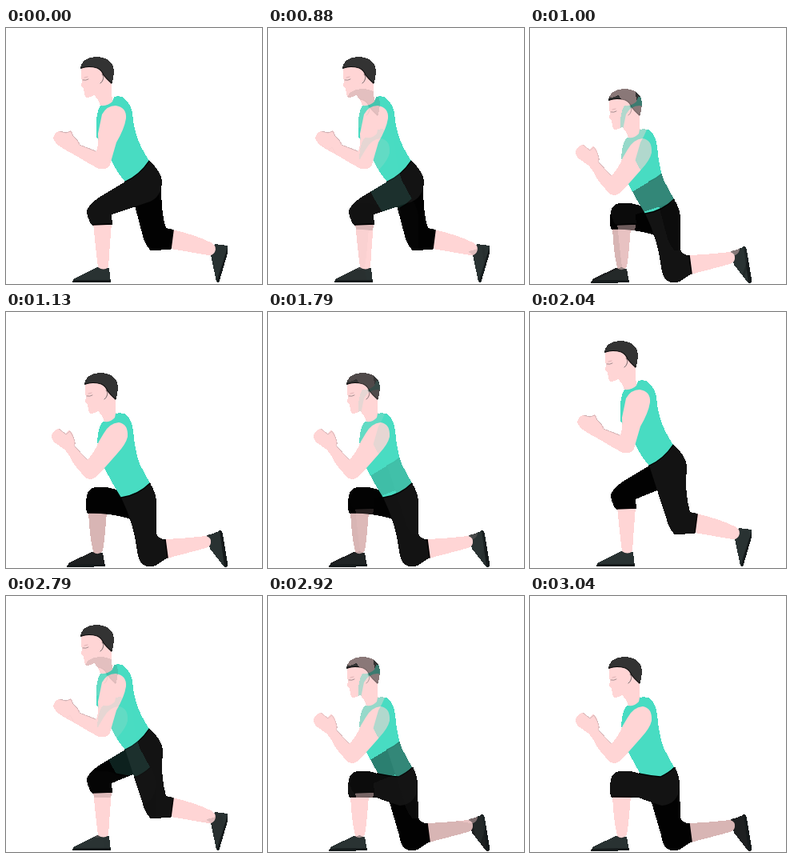
Write an HTML page with a canvas that moves like this. It is 320 px wide and 320 px high and loops after 3370 ms.

```html
<!DOCTYPE html>
<html lang="en">
<head>
<meta charset="utf-8">
<title>Lunge</title>
<style>
  html, body { margin: 0; width: 100%; height: 100%; overflow: hidden; background: #fff; }
  canvas { display: block; width: 100vmin; height: 100vmin; }
</style>
</head>
<body>
<canvas id="stage" width="320" height="320"></canvas>
<script>
const SIZE = 320, LOOP = 3370, FADE_STEPS = 7;
const SKIN = '#ffd5d5', SHADE = '#d8b5b4', SHIRT = '#48dcc2', HAIR = '#333';
const NEAR = '#131313', FAR = '#020202', SHOE = '#293232', DARK_SHOE = '#1e2021';
const SOLE = '#151a1b', LINE = '#c9adaf';

function makeCanvas() {
  const c = document.createElement('canvas');
  c.width = c.height = SIZE;
  return c;
}

function fill(g, color, d) {
  g.fillStyle = color;
  g.fill(new Path2D(d));
}

function line(g, color, width, d) {
  g.strokeStyle = color;
  g.lineWidth = width;
  g.lineCap = 'round';
  g.stroke(new Path2D(d));
}

// Gives the figure a hard cut-out outline.
function cutOut(g) {
  const img = g.getImageData(0, 0, SIZE, SIZE);
  for (let i = 3; i < img.data.length; i += 4) img.data[i] = img.data[i] < 128 ? 0 : 255;
  g.putImageData(img, 0, 0);
}

function head(g, dx, dy) {
  g.save();
  g.translate(dx, dy);
  fill(g, SKIN, 'M94 48 Q93 58 95 66 L94 72 L97 75 L98 82 Q98 87 103 87 L110 84 Q115 88 118 97 Q127 100 134 92 Q131 83 132 69 L128 50 Z');
  fill(g, HAIR, 'M93 51 Q94 37 114 36 Q133 37 135 53 Q135 62 132 70 Q126 64 122 59 Q120 53 114 50 Q104 47 93 51 Z');
  line(g, '#0c0c0c', 1.2, 'M94 50 Q104 47 114 50 Q120 53 122 59 Q126 64 132 69');
  fill(g, SKIN, 'M117 58 Q122 57 122 62 Q121 68 118 69 Z');
  line(g, '#77696b', 1, 'M120 58 Q123 60 121 65 Q120 68 118 69');
  line(g, '#a58e90', 1, 'M96 65 Q100 66 103 64');
  line(g, '#d7a9ab', 0.8, 'M98 62 L102 61');
  g.restore();
}

const UP = {
  head: [0, 0],
  shirt: 'M118 97 Q127 98 133 92 L135 86 Q142 84 147 87 Q156 95 158 106 Q159 122 164 137 Q169 151 179 166 Q167 184 149 192 Q138 180 131 164 L113 136 Q111 108 118 97 Z',
  hem: 'M179 166 Q167 184 149 192',
  arm: 'M120 108 Q126 97 137 97 Q151 99 150 113 Q148 126 138 143 Q133 160 130 171 Q126 178 116 176 Q101 168 88 160 L72 151 Q61 145 59 138 Q60 131 66 129 L75 131 L81 128 Q84 130 83 134 L88 140 Q92 142 92 146 L113 154 Q116 146 115 132 Z',
  armLine: 'M67 129 L75 131 L81 129 L84 135 Q91 141 92 146 L112 154',
  backShin: 'M208 252 Q238 259 258 269 Q264 274 261 280 Q258 285 253 284 L206 276 Z',
  backShoe: 'M261 270 L277 272 L277 281 L266 318 L263 317 L256 284 Z',
  backSole: 'M277 274 L277 281 L266 318 L263 317 Z',
  frontShin: 'M109 244 L132 244 L129 282 L128 299 Q122 304 115 299 Q112 275 109 244 Z',
  frontShoe: 'M114 299 L129 300 L131 318 L83 318 Q83 314 88 312 Z',
  frontSole: 'M84 315 L131 315 L131 318 L83 318 Z',
  backCuff: 'M209 253 L206 276',
  frontCuff: 'M108 246 L133 245'
};

const DOWN = {
  head: [5, 40],
  shirt: 'M121 137 Q130 139 136 132 L137 127 Q144 125 150 128 Q157 135 159 148 Q161 173 167 190 L180 214 Q165 229 144 232 L133 214 L123 195 L114 162 Q115 143 121 137 Z',
  hem: 'M180 214 Q165 229 144 232',
  arm: 'M122 152 Q129 139 141 138 Q153 140 152 156 Q150 165 139 177 L116 203 Q109 211 101 208 Q91 199 83 187 Q78 176 72 171 L62 164 Q56 159 57 154 Q60 146 67 146 L74 152 L79 148 Q84 150 84 156 Q87 160 86 168 L102 185 Q112 173 116 162 Z',
  armLine: 'M66 146 L75 153 L80 149 L84 156 Q87 161 86 168 L101 184',
  backShin: 'M198 284 Q225 283 250 280 Q257 282 256 288 Q256 293 250 295 L201 308 Z',
  backShoe: 'M251 279 Q261 277 267 273 L270 274 Q273 291 277 315 Q277 320 273 319 L255 296 Z',
  backSole: 'M267 273 L270 274 Q273 291 277 315 Q277 320 273 318 Z',
  frontShin: 'M103 249 L126 249 Q124 278 121 299 Q115 305 109 300 Q104 277 103 249 Z',
  frontShoe: 'M107 300 L121 301 L124 318 L76 319 Q77 314 82 312 Z',
  frontSole: 'M77 316 L124 315 L124 318 L76 319 Z',
  backCuff: 'M199 284 L202 307',
  frontCuff: 'M102 251 L127 251'
};

// Leg outlines differ with the side that is nearer to the viewer.
const POSES = [
  { body: UP, near: 'front',
    front: 'M149 192 Q168 184 179 166 Q194 179 195 192 Q194 211 180 217 Q156 225 132 233 L133 246 L107 246 Q101 237 101 228 Q105 219 116 212 Z',
    back: 'M161 222 L194 197 Q194 232 200 250 L209 252 L206 277 L181 278 Q174 272 171 260 Z' },
  { body: DOWN, near: 'back',
    front: 'M112 219 Q126 217 142 224 L160 232 L158 260 Q138 252 101 251 Q98 240 102 226 Q105 220 112 219 Z',
    back: 'M144 232 Q166 229 180 214 Q188 226 188 239 L188 277 Q190 284 199 284 L202 307 Q196 311 187 317 Q174 321 168 312 Q165 307 164 299 Q160 265 144 232 Z' },
  { body: UP, near: 'back',
    front: 'M149 192 L172 190 L172 218 Q153 225 132 234 L133 246 L107 246 Q101 237 101 228 Q105 219 116 212 Z',
    back: 'M149 192 Q168 184 179 166 Q196 180 196 195 Q193 224 200 250 L209 252 L206 277 L181 278 Q174 272 171 260 Z' },
  { body: DOWN, near: 'front', hem: 'M136 222 Q150 225 163 226 Q174 221 181 214',
    front: 'M112 219 Q125 217 136 222 Q150 225 163 226 Q174 221 181 214 Q188 226 187 239 Q185 260 165 262 Q148 257 136 252 L101 251 Q98 240 102 226 Q105 220 112 219 Z',
    back: 'M151 255 L187 236 L188 277 Q190 284 199 284 L202 307 Q196 311 187 317 Q174 321 168 312 Q165 307 164 299 Z' }
];

function leg(g, pose, side) {
  const b = pose.body, isNear = pose.near === side;
  const shaded = b === DOWN && !isNear;
  fill(g, shaded ? DARK_SHOE : SHOE, b[side + 'Shoe']);
  fill(g, SOLE, b[side + 'Sole']);
  fill(g, shaded ? SHADE : SKIN, b[side + 'Shin']);
  fill(g, isNear ? NEAR : FAR, pose[side]);
  line(g, '#000', 1.5, b[side + 'Cuff']);
}

function drawPose(pose) {
  const c = makeCanvas(), g = c.getContext('2d'), b = pose.body;
  head(g, ...b.head);
  leg(g, pose, pose.near === 'front' ? 'back' : 'front');
  fill(g, SHIRT, b.shirt);
  leg(g, pose, pose.near);
  line(g, '#000', 1.3, pose.hem || b.hem);
  fill(g, SKIN, b.arm);
  line(g, LINE, 0.8, b.armLine);
  cutOut(g);
  return c;
}

const images = POSES.map(drawPose);
const fadeTicks = [21, 43, 67];
const tickTime = n => Math.round(n / 24 * 100) * 10;
const ctx = document.getElementById('stage').getContext('2d');

function render(t) {
  let from = 0, step = 0;
  fadeTicks.forEach((tick, i) => {
    if (t < tickTime(tick)) return;
    from = i;
    step = 0;
    while (step < FADE_STEPS && t >= tickTime(tick + step)) step++;
  });
  const mix = step / FADE_STEPS;
  const late = mix > 0.5;
  ctx.globalCompositeOperation = 'source-over';
  ctx.globalAlpha = 1;
  ctx.clearRect(0, 0, SIZE, SIZE);
  ctx.drawImage(images[late ? from + 1 : from], 0, 0);

  // The fainter pose shows only inside the stronger one's outline.
  ctx.globalCompositeOperation = 'source-atop';
  ctx.globalAlpha = late ? 1 - mix : mix;
  ctx.drawImage(images[late ? from : from + 1], 0, 0);
}

const start = performance.now();
function tick() {
  render((performance.now() - start) % LOOP);
  requestAnimationFrame(tick);
}
tick();
</script>
</body>
</html>
```
